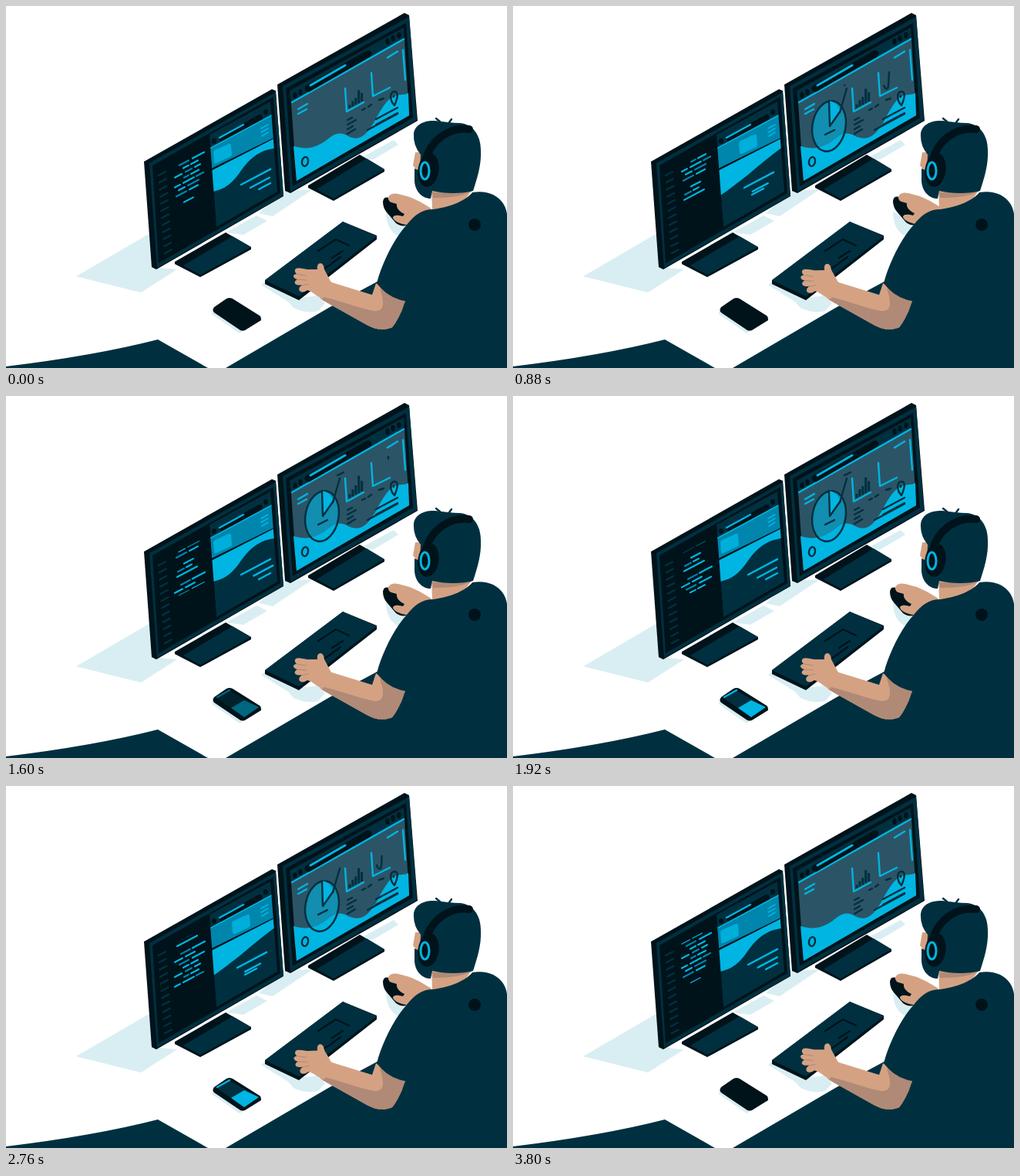
Write an HTML page that moves like this. It is 650x470 px and loops after 3.84 s.

```html
<!DOCTYPE html>
<html lang="en">
<head>
<meta charset="utf-8">
<title>Developer at work</title>
<style>
  html, body { margin: 0; width: 100%; height: 100%; overflow: hidden; background: #fff; }
  svg { display: block; }
  .navy { fill: #003040; } .black { fill: #00131a; } .blue { fill: #00b5e2; } .mid { fill: #0085ad; }
  .pale { fill: #d8eef3; } .skin { fill: #d4a283; } .shade { fill: #b08a76; } .slate { fill: #2b5566; }
  .line { fill: none; stroke-width: 2.4; stroke-linecap: round; stroke-linejoin: round; }
  .line.navy { stroke: #003040; } .line.black { stroke: #00131a; } .line.shade { stroke: #b08a76; }
  .line.blue { stroke: #00b5e2; } .line.mid { stroke: #0085ad; }
  .line.navy, .line.black, .line.blue, .line.mid, .line.shade { fill: none; }
  #code .line { stroke-width: 2.2; }
</style>
</head>
<body>
<svg width="650" height="470" viewBox="0 0 650 470">
  <defs>
    <clipPath id="codeClip"><path d="M214 207 263 181V239L214 265Z"/></clipPath>
    <clipPath id="pageClip"><path d="M264 167 343 124 352 241 273 287Z"/></clipPath>
  </defs>

  <!-- floor and shadows -->
  <path class="navy" d="M0 468Q115 454 197 433L262 470H0ZM285 470 420 391 485 356 600 470Z"/>
  <path class="pale" d="M91 351 187 295 190 339 222 342 175 372ZM285 294 325 272 339 279 308 297ZM328 269 362 240 398 238 346 273ZM455 200 503 174 509 180 477 199Z"/>
  <path class="pale" d="M331 362 337 357 380 379 404 376 414 386 405 396Q390 400 373 392L366 384ZM493 267 522 282 512 300Q493 293 493 267Z"/>

  <!-- stands -->
  <path class="black" d="M219 332 285 294 318 313V316L252 352 219 335ZM392 233 459 193 491 212V215L425 253 392 236Z"/>
  <path class="navy" d="M230 337 294 299 318 313 252 349ZM403 238 468 198 491 212 425 250Z"/>

  <!-- left monitor -->
  <path class="black" d="M179 202 345 108 350 110 360 247 195 342 189 339Z"/>
  <path class="navy" d="M186 204 350 112 360 246 196 340Z"/>
  <path class="black" d="M190 207 347 118 356 243 198 334Z"/>
  <g id="sidebar" class="line navy"></g>
  <g clip-path="url(#codeClip)"><g id="code"></g></g>
  <g clip-path="url(#pageClip)">
    <path class="navy" d="M264 167 345 122 355 242 273 288Z"/>
    <path class="line black" style="stroke-width:8" d="M281 172 329 145"/>
    <path class="line black" style="stroke-width:6" d="M270 176V175M337 138V137"/>
    <path class="line blue" d="M277 171 308 154"/>
    <path class="mid" d="M264 185 348 140 350 171 267 211Z"/>
    <path class="line blue" style="stroke-width:1.5" d="M264 185 348 140"/>
    <path id="card" class="blue" opacity=".85" d="M271 187 289 179Q292 178 292 181L293 192Q293 195 290 196L273 204Q270 205 270 202L269 191Q269 188 271 187Z"/>
    <path class="line blue" style="stroke-width:1.6" d="M331 159 340 154M331 164 340 159M332 169 340 164"/>
    <path class="line black" d="M265 213 350 171"/>
    <path id="hill" class="blue"/>
    <path id="notes" class="line blue"/>
  </g>

  <!-- right monitor -->
  <path class="black" d="M352 102 517 9 523 12 534 149 369 243 362 240Z"/>
  <path class="navy" d="M359 104 523 14 533 148 369 241Z"/>
  <path class="black" d="M363 107 519 22 528 145 372 234Z"/>
  <path class="navy" d="M368 110 516 28 517 43 370 126Z"/>
  <path class="slate" d="M370 126 517 43 523 142 377 227Z"/>
  <path id="wave" class="blue"/>
  <path class="line blue" d="M371 125 516 43M379 134 391 127M379 140 390 134M495 67 508 59M515 57 518 96"/>
  <path class="line black" style="stroke-width:9" d="M392 107 470 62"/>
  <path class="line blue" style="stroke-width:3" d="M395 103 440 77"/>
  <g class="black">
    <ellipse cx="375" cy="116" rx="2.7" ry="4"/><ellipse cx="382" cy="112" rx="2.7" ry="4"/>
    <ellipse cx="495" cy="46" rx="2.7" ry="4"/><ellipse cx="502" cy="42" rx="2.7" ry="4"/><ellipse cx="510" cy="38" rx="2.7" ry="4"/>
  </g>
  <path class="line blue" d="M440 107 442 137 464 125M474 87 476 117 498 106"/>
  <path id="bars" class="line navy" style="stroke-width:3;stroke-linecap:butt"/>
  <path class="line navy" d="M443 148 449 145M443 154 454 148M443 160 450 156M443 166 453 160M462 135 466 133M470 131 474 128M484 122 490 120M480 147 508 132M469 161 508 140M480 154 508 139"/>
  <path class="line navy" d="M504 129C498 123 497 112 504 111 510 111 508 120 504 129ZM503 118V117"/>
  <ellipse class="line navy" cx="388" cy="202" rx="4" ry="6" transform="rotate(12 388 202)"/>
  <g id="pie">
    <ellipse class="blue" fill-opacity=".6" cx="410" cy="156" rx="21.5" ry="33" transform="rotate(10 410 156)" stroke="#003040" stroke-width="2.4"/>
    <path class="blue" d="M411 156 410 123Q419 124 425 136Z"/>
    <path class="line navy" d="M410 123 411 156 425 136M405 167 417 161"/>
  </g>
  <path id="leader" class="line navy" pathLength="100" d="M424 138 433 107"/>
  <path id="label" class="line navy" pathLength="100" d="M430 103 438 99"/>
  <path id="graph" class="line navy" pathLength="100" d="M481 103Q483 109 486 107C488 103 487 94 488 86 488 80 490 80 491 83 493 89 496 85 496 79"/>

  <!-- keyboard -->
  <path class="black" d="M336 356 437 280 481 298V303L380 382 336 361Z"/>
  <path class="navy" d="M336 356 437 280 481 299 380 377Z"/>
  <path class="line black" d="M405 318 428 303 445 311M423 327 437 318M411 342 422 335M423 334 434 326"/>

  <!-- phone -->
  <g id="phone">
    <path class="pale" d="M268 394 304 421 309 421 303 425 267 400Z"/>
    <path class="black" d="M270 391 286 380Q290 378 294 380L329 402Q331 403 331 408L310 421Q307 422 304 421L270 398Q267 395 270 391Z"/>
    <g id="phoneScreen">
      <path class="navy" d="M273 392 289 382 328 404 309 417Z"/>
      <path class="line blue" d="M274 391 290 382"/>
      <path class="blue" d="M292 405 309 395 328 404 309 417Z"/>
    </g>
  </g>

  <!-- mouse and right hand -->
  <g id="mouseHand">
    <path class="black" d="M489 254Q490 247 497 249L515 261Q525 272 521 284 514 288 506 282L494 268Q489 262 489 254Z"/>
    <path class="skin" d="M496 251C495 245 502 242 509 244L524 248 537 254 552 263 535 294 519 284C511 283 503 279 502 275 502 271 509 271 515 273L517 270C510 267 506 262 507 257L500 255Q497 254 496 251Z"/>
  </g>

  <!-- left arm -->
  <g id="arm">
    <path class="skin" d="M480 360 518 382C514 402 507 416 499 418 487 422 477 419 468 414L409 381 398 368 406 354 420 358 475 375Z"/>
    <path class="shade" d="M409 377C433 382 459 393 478 396 493 396 490 382 485 367L518 382C514 402 507 416 499 418 487 422 477 419 468 414L411 382Z"/>
    <g id="hand">
      <path class="skin" d="M376 341C379 339 386 341 391 342L404 342Q403 334 408 334 412 334 413 342L422 359 411 380C404 378 397 370 391 369 384 374 378 370 381 365L384 362C374 364 372 358 378 355 371 353 372 348 377 348Q373 344 376 341Z"/>
      <path class="line shade" style="stroke-width:1" d="M378 348 389 350M378 355 390 356M383 363 392 361"/>
    </g>
  </g>

  <!-- head and torso -->
  <path class="skin" d="M531 190 528 207 535 216 552 235 553 266 592 257 605 238 560 190Z"/>
  <path class="shade" d="M553 242Q582 243 605 235L604 241Q585 250 554 249Z"/>
  <path class="navy" d="M481 360C488 333 504 301 520 284 530 271 540 264 554 264 578 261 597 252 605 242 628 238 647 249 650 270V470H470L500 419Q512 404 518 383Q495 379 481 360Z"/>
  <path class="navy" d="M529 166C530 154 543 148 557 149 568 150 580 152 590 152 605 154 616 167 616 187 617 207 611 224 606 240 592 244 569 244 553 240L551 250C540 250 529 240 530 223L530 211 537 214 538 193Q528 181 529 166Z"/>
  <path class="line navy" d="M563 150 558 146M575 151 578 147M606 173Q611 171 613 174"/>
  <path class="line black" style="stroke-width:10" d="M545 199C551 175 575 156 601 160"/>
  <ellipse class="black" cx="548" cy="213" rx="13.5" ry="22" transform="rotate(8 548 213)"/>
  <ellipse class="line blue" cx="543.500" cy="214" rx="5.500" ry="11" style="stroke-width:3"/>
  <circle class="black" cx="608" cy="284" r="8"/>
</svg>
<script>
const LOOP = 3840, HALF = LOOP / 2;
const el = id => document.getElementById(id);
const set = (id, name, value) => el(id).setAttribute(name, value);
const mix = (a, b, k) => a + (b - a) * k;
const ramp = (t, from, to) => {
  const k = Math.min(1, Math.max(0, (t - from) / (to - from)));
  return k * k * (3 - 2 * k);
};
const pulse = (t, a, b, c, d) => ramp(t, a, b) - ramp(t, c, d);

// Every line on the screens rises to the right with this slope.
const SLOPE = -0.53;
const dash = (x, y, w) => `M${x} ${y}l${w} ${w * SLOPE}`;

// Code rows: pairs of start offset and width.
const ROWS = [
  [6, 12, 23, 15], [11, 7, 21, 9], [0, 9, 14, 8, 26, 7], [12, 6, 21, 10],
  [0, 7, 11, 14, 28, 9], [5, 8, 17, 14], [2, 13, 19, 11], [],
  [12, 12], [4, 8, 15, 7], [3, 26], [],
  [8, 12, 23, 16], [0, 10, 14, 12]
];
const GAP = 6.4, CYCLE = ROWS.length * GAP;
let code = "";
for (let copy = 0; copy < 3; copy++) {
  ROWS.forEach((row, i) => {
    for (let j = 0; j < row.length; j += 2) {
      const y = 210 + i * GAP + copy * CYCLE + row[j] * SLOPE;
      const tone = (i * 2 + j) % 3 ? "blue" : "mid";
      code += `<path class="line ${tone}" d="${dash(219 + row[j], y, row[j + 1])}"/>`;
    }
  });
}
el("code").innerHTML = code;

let sidebar = "";
for (let i = 0; i < 12; i++) sidebar += `<path d="${dash(198 + i * 0.7, 220 + i * 9.2, 9)}"/>`;
el("sidebar").innerHTML = sidebar;

function trim(id, from, to) {
  set(id, "stroke-dasharray", `${to - from} 300`);
  set(id, "stroke-dashoffset", -from);
  set(id, "visibility", to - from > 0.5 ? "visible" : "hidden");
}

function render(t) {
  const p = t % HALF;

  // page carousel
  const slide = pulse(p, 420, 640, 1300, 1470);
  set("card", "transform", `translate(${24 * slide} ${-12 * slide})`);
  const at = (x, y, x2, y2) => `${mix(x, x2, slide)} ${mix(y, y2, slide)} `;
  set("hill", "d", "M266 214 350 171V184L347 185C" + at(325, 188, 332, 196) + at(312, 203, 318, 208) +
    at(302, 218, 305, 219) + at(293, 230, 292, 229) + at(285, 237, 282, 237) + at(269, 241, 269, 246) + "Z");
  const sway = Math.sin(2 * Math.PI * p / HALF);
  const x = 305 - 5 * slide, y = 232 + 4 * slide;
  set("notes", "d", dash(x, y, 38) + dash(x + 12 - 5 * sway, y + 4 + 3 * sway, 25 - 5 * slide) +
    dash(x + 23 - 13 * slide, y + 6 + 3 * slide, 15));

  set("code", "transform", `translate(0 ${-CYCLE * t / LOOP})`);

  // charts
  const drift = 2 + 3 * Math.sin(Math.PI * p / HALF);
  set("wave", "d", `M373 182C391 187 402 184 416 174 428 163 436 164 444 169 ${458 + drift} 177 ${466 + drift} 166 ` +
    `${476 + drift} 150 ${485 + drift} 133 ${492 + drift} 121 504 117 512 114 517 116 522 113L523 142 377 227Z`);
  const pie = pulse(t, 420, 760, 3240, 3540);
  set("pie", "transform", `translate(410 156) scale(${pie}) translate(-410 -156)`);
  trim("leader", 0, 100 * pulse(t, 680, 880, 2800, 3050));
  trim("label", 0, 100 * pulse(t, 860, 1040, 2520, 2740));
  trim("graph", 100 * ramp(p, 840, 1720), 100 * ramp(p, 560, 1130));

  let bars = "";
  [4, 7, 9, 17, 11].forEach((h, i) => {
    const grow = 1 + 0.4 * Math.sin(Math.PI * t / LOOP) ** 2 * (0.75 + 0.25 * Math.cos(t / LOOP * 8 * Math.PI + i));
    bars += `M${446 + i * 3.9} ${132.5 - i * 2.1}v${-h * grow}`;
  });
  set("bars", "d", bars);

  // phone
  const buzz = t > 1560 && t < 1840 ? Math.sin(t / 80 * Math.PI) : 0;
  set("phone", "transform", `translate(${buzz} ${buzz * 0.5})`);
  set("phoneScreen", "opacity", pulse(t, 1560, 1640, 3600, 3700));

  // hands
  const tap = (1 - Math.cos(2 * Math.PI * t / 320)) / 2;
  set("hand", "transform", `translate(${1.5 * tap} ${1.2 * tap}) rotate(${-3 * tap} 415 368)`);
  const move = pulse(t, 560, 840, 940, 1240) + pulse(t, 2080, 2300, 2360, 2640);
  set("mouseHand", "transform", `translate(${4 * move} ${-move})`);
}

function tick() {
  render(performance.now() % LOOP);
  requestAnimationFrame(tick);
}
tick();
</script>
</body>
</html>
```
